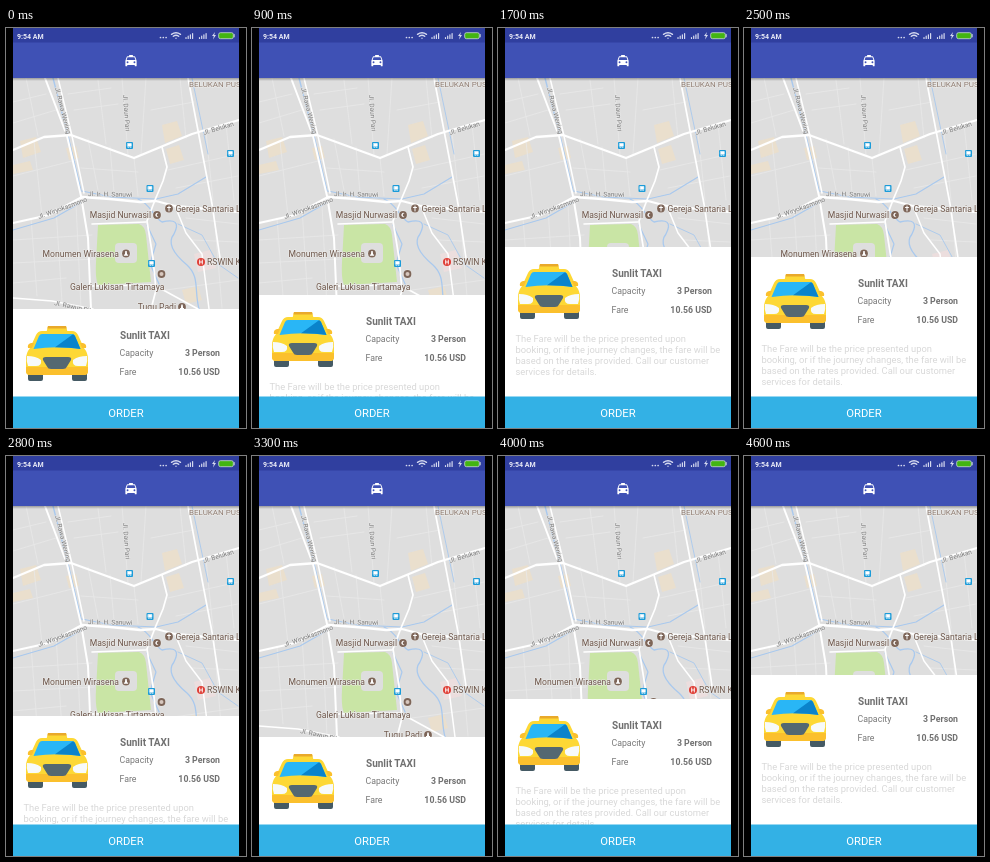
These frames come from a looping animation (240x400 px, 4700 ms). An HTML page:

```html
<!DOCTYPE html>
<html lang="en">
<head>
<meta charset="utf-8">
<title>Taxi order sheet</title>
<style>
  html, body { margin: 0; width: 100%; height: 100%; overflow: hidden; background: #000; }
  svg { display: block; width: 100%; height: 100%; font-family: Roboto, sans-serif; }
  path { stroke-linejoin: round; stroke-linecap: round; }
  .line { fill: none; }
  .place { font-size: 8.6px; fill: #6d564b; stroke: #ececea; stroke-width: 1.2px; paint-order: stroke; }
  .street { font-size: 6.5px; fill: #777; stroke: #eaeaea; stroke-width: 1px; paint-order: stroke; }
  .end { text-anchor: end; }
  .detail { font-size: 8.75px; fill: #777; }
  .bold { font-weight: 700; fill: #707070; }
  .note { font-size: 9.375px; fill: #d8d8d8; }
</style>
</head>
<body>
<svg viewBox="0 0 240 400">
  <defs>
    <g id="stop">
      <rect x="-3.5" y="-3.5" width="7" height="7" rx="1" fill="#1b9bd8"/>
      <path d="M-1.800-2h3.600v2.800h-3.600zM-1.500 2h.8M.7 2h.8" fill="#fff" stroke="#fff" stroke-width=".6"/>
    </g>
    <g id="pin">
      <circle r="4.4" fill="#ececea"/>
      <circle r="3.9" fill="#7d6558"/>
    </g>
    <path id="signal" class="line" d="M0 6v-1M2.200 6v-2.300M4.400 6v-3.700M6.600 6v-5" stroke="#d5d9ef" stroke-width="1.200"/>
    <linearGradient id="shade" x2="0" y2="1">
      <stop stop-color="#000" stop-opacity=".3"/>
      <stop offset="1" stop-color="#000" stop-opacity="0"/>
    </linearGradient>
  </defs>

  <rect width="240" height="400" fill="#dedede"/>

  <g id="map">
    <!-- built-up blocks -->
    <path fill="#eadfcd" d="M14 113L30 109L35 124L17 130zM7 137L24 133L27 142L7 146zM156 97L171 93L176 108L159 115zM160 121L173 117L178 132L164 136zM60 120L70 118L73 130L63 132zM176 262L192 258L196 272L180 276z"/>
    <path fill="#ecdede" d="M188 226L204 222L210 240L192 244z"/>
    <!-- minor streets -->
    <path class="line" stroke="#e9e9e9" stroke-width=".8" d="M7 74L40 66M7 95L50 82M20 50L32 108M7 148L70 132M28 113L36 188M68 82L112 76M62 66L105 60M92 52L100 116M116 50L122 127M140 50L135 126M82 111L92 162M104 119L108 165M75 140L132 144M128 130L132 168M174 50L180 110M145 82L188 74M200 104L207 172M162 142L232 126M170 160L232 148M220 96L228 172M7 212L86 207M7 235L88 231M25 190L31 268M50 180L56 274M70 176L75 280M7 255L60 250M180 190L232 196M186 212L232 214M208 185L216 280M160 262L232 252"/>
    <!-- water -->
    <g class="line" stroke="#a9c9ee">
      <path stroke-width="1.4" d="M47 50L62 108L75 163"/>
      <path stroke-width="1.3" d="M132 171C145 176 147 189 156 194C169 191 174 194 168 206C160 216 169 227 181 237C194 249 188 262 193 281"/>
      <path stroke-width="1.2" d="M76 163L105 169L150 171L172 166L200 149M7 202L48 190L76 174M141 197L150 216L144 236L154 258"/>
      <path stroke-width=".9" d="M186 50L202 126M172 196L196 207L212 236L232 250"/>
    </g>
    <!-- main roads -->
    <g class="line" stroke="#fff">
      <path stroke-width="2" d="M39 50L61 108L75 168L82 210L85 281"/>
      <path stroke-width="1.5" d="M52 50L66 108L78 165"/>
      <path stroke-width="2.3" d="M7 122L38 109L65 107L128 130L186 106L233 92"/>
      <path stroke-width="2.3" d="M7 195L43 187L76 169L104 171L134 174L150 173L169 178L233 184"/>
      <path stroke-width="1.7" d="M156 119L161 139L157 153L149 172L141 193L147 230L150 262L145 281M182 50L206 176L214 230"/>
      <path stroke-width="1.5" d="M7 270L46 273L87 281M86 258L148 257L192 281M86 196L140 194M169 178L180 205L196 226L203 281"/>
    </g>
    <!-- park -->
    <path fill="#c9e5a5" d="M92 197L133 196Q139 198 140 207L145 254L92 257Q89 250 90 234z"/>
    <rect x="109" y="215" width="22" height="20" rx="4" fill="#dedede"/>

    <use href="#stop" x="123.500" y="117.500"/>
    <use href="#stop" x="224.500" y="125.500"/>
    <use href="#stop" x="144" y="160.500"/>
    <use href="#stop" x="145.500" y="235.500"/>

    <use href="#pin" x="151" y="187"/>
    <path d="M152.500 185.200a2.100 2.100 0 1 0 0 3.600a1.600 1.600 0 1 1 0-3.600" fill="#fff"/>
    <use href="#pin" x="163" y="180.500"/>
    <path class="line" d="M163 178v5M161.500 179.500h3" stroke="#fff"/>
    <use href="#pin" x="120" y="225.500"/>
    <path d="M119.300 223h1.400l.4 3.500h1v1.200h-4.200v-1.200h1z" fill="#fff"/>
    <use href="#pin" x="155.500" y="246"/>
    <circle cx="155.500" cy="246" r="2" fill="#d7c7be"/>
    <use href="#pin" x="176" y="279"/>
    <path d="M175.300 276.500h1.400l.4 3.500h1v1.200h-4.200v-1.200h1z" fill="#fff"/>
    <circle cx="195" cy="234" r="4" fill="#df3e36"/>
    <path class="line" d="M193.700 232v4M196.300 232v4M193.700 234h2.600" stroke="#fff" stroke-width=".9"/>

    <g class="street">
      <text transform="translate(49 60) rotate(76)">Jl. Rawa Wening</text>
      <text transform="translate(117 67) rotate(86)">Jl. Daun Pari</text>
      <text transform="translate(198 107) rotate(-17)">Jl. Belukan</text>
      <text transform="translate(82 168) rotate(1)">Jl. Ir. H. Sanuwi</text>
      <text transform="translate(33 191) rotate(-20)">Jl. Wiryokasmono</text>
      <text transform="translate(48 277) rotate(12)">Jl. Rawun Pitu</text>
    </g>
    <g class="place">
      <text x="183" y="59" font-size="8" fill="#8f7c72">BELUKAN PUS</text>
      <text class="end" x="145" y="190">Masjid Nurwasil</text>
      <text x="169.500" y="183.500">Gereja Santaria L</text>
      <text class="end" x="113" y="228.500">Monumen Wirasena</text>
      <text x="64" y="262">Galeri Lukisan Tirtamaya</text>
      <text x="201" y="237">RSWIN K</text>
      <text class="end" x="170" y="282">Tugu Padi</text>
    </g>
  </g>

  <g id="sheet">
    <rect width="240" height="200" fill="#fff"/>
    <g id="car">
      <path d="M22 60h15v10q0 2-2 2H24q-2 0-2-2zM66 60h15v10q0 2-2 2H68q-2 0-2-2z" fill="#455a64"/>
      <path d="M42 17h18l1.500 6h-21z" fill="#fdd835"/>
      <path d="M42 17h18l.6 2.500h-19.200z" fill="#e9a92b"/>
      <path d="M36 22H66Q70 22 72 26L78 39Q82 44 82 50V62Q82 66 78 66H24Q20 66 20 62V50Q20 44 24 39L30 26Q32 22 36 22z" fill="#fdd835"/>
      <path d="M25 34h3l-2 5h-4q-1-4 3-5M77 34h-3l2 5h4q1-4-3-5" fill="#fbc02d"/>
      <path d="M36 25H66Q68 25 69 27L74.500 40Q51 36.500 27.500 40L33 27Q34 25 36 25z" fill="#29b6f6"/>
      <path d="M67 25.300Q68.500 26 69 27L74.500 40Q64 38.300 49 38.300z" fill="#0a83cb"/>
      <path d="M20 58H82V62Q82 66 78 66H24Q20 66 20 62z" fill="#fbc02d"/>
      <path d="M40 48H62Q66 48 65 51L61 57.500Q60 60 57 60H45Q42 60 41 57.500L37 51Q36 48 40 48z" fill="#546871"/>
      <path d="M21 47Q30 47 35 51Q36 57 30 57H22Q20 52 21 47zM81 47Q72 47 67 51Q66 57 72 57H80Q82 52 81 47z" fill="#f7fafa"/>
    </g>
    <text x="114" y="29.500" font-size="10" class="bold">Sunlit TAXI</text>
    <g class="detail">
      <text x="113.500" y="47">Capacity</text>
      <text x="113.500" y="66">Fare</text>
      <text x="214" y="47" class="bold end">3 Person</text>
      <text x="214" y="66" class="bold end">10.56 USD</text>
    </g>
    <g class="note">
      <text x="17.500" y="95">The Fare will be the price presented upon</text>
      <text x="17.500" y="106">booking, or if the journey changes, the fare will be</text>
      <text x="17.500" y="117">based on the rates provided. Call our customer</text>
      <text x="17.500" y="128">services for details.</text>
    </g>
  </g>

  <rect y="368.500" width="240" height="32" fill="#33b1e5"/>
  <text x="120" y="389" font-size="11.250" fill="#fff" text-anchor="middle">ORDER</text>

  <rect y="50" width="240" height="3" fill="url(#shade)"/>
  <rect width="240" height="50" fill="#3f51b5"/>
  <rect width="240" height="14.500" fill="#303f9f"/>
  <path transform="translate(117.500 25.200) scale(.625)" fill="#fff" fill-rule="evenodd" d="M9 3h6v2h2.500q1 0 1.400 1L21 12v8q0 1-1 1h-1q-1 0-1-1v-1H6v1q0 1-1 1H4q-1 0-1-1v-8l2.100-6q.4-1 1.400-1H9zM5 11h14l-1.500-4.500h-11zM5 14.500a1.500 1.500 0 1 0 3 0a1.500 1.500 0 1 0-3 0M16 14.500a1.500 1.500 0 1 0 3 0a1.500 1.500 0 1 0-3 0"/>

  <g id="status">
    <text x="11" y="10.500" font-size="7" font-weight="700" fill="#e8eaf6">9:54 AM</text>
    <path class="line" d="M154.500 9.500h.01M157.300 9.500h.01M160.100 9.500h.01" stroke="#d5d9ef" stroke-width="1.700"/>
    <path class="line" d="M165.500 6.300q4.500-3 9 0M167.300 8.300q2.700-2 5.400 0M170 10.200h.01" stroke="#d5d9ef" stroke-width="1.400"/>
    <use href="#signal" x="180" y="4.500"/>
    <use href="#signal" x="193.500" y="4.500"/>
    <path d="M209 4l-3 4h1.800l-.8 3.500l3-4.500h-1.800z" fill="#d5d9ef"/>
    <rect x="212.700" y="4.700" width="14.600" height="6" rx="1.700" fill="#43b512" stroke="#c8d7d5" stroke-width=".8"/>
    <path d="M228.200 6.500v2.400" stroke="#c8d7d5"/>
  </g>

  <path d="M0 0h7v400H0zM233 0h7v400h-7z"/>
</svg>
<script>
  const LOOP = 4700, STEP = 100, LOW = 281, HIGH = 219;
  const sheet = document.getElementById('sheet');

  const progress = (t, start, end) => Math.min(1, Math.max(0, (t - start) / (end - start)));
  const flick = x => x + x * x - x * x * x;
  const settle = x => x * x * (3 - 2 * x);

  // The screen refreshes ten times a second.
  function openness(t) {
    if (t < 2300) return flick(progress(t, 800, 1300));
    if (t < 3700) return 1 - settle(progress(t, 2300, 3130));
    return flick(progress(t, 3700, 4300));
  }

  function draw(now) {
    const t = Math.floor((now % LOOP) / STEP) * STEP;
    const top = Math.ceil(LOW + (HIGH - LOW) * openness(t));
    sheet.setAttribute('transform', `translate(0 ${top})`);
  }

  const begin = performance.now();
  function tick() {
    draw(performance.now() - begin);
    requestAnimationFrame(tick);
  }
  tick();
</script>
</body>
</html>
```
